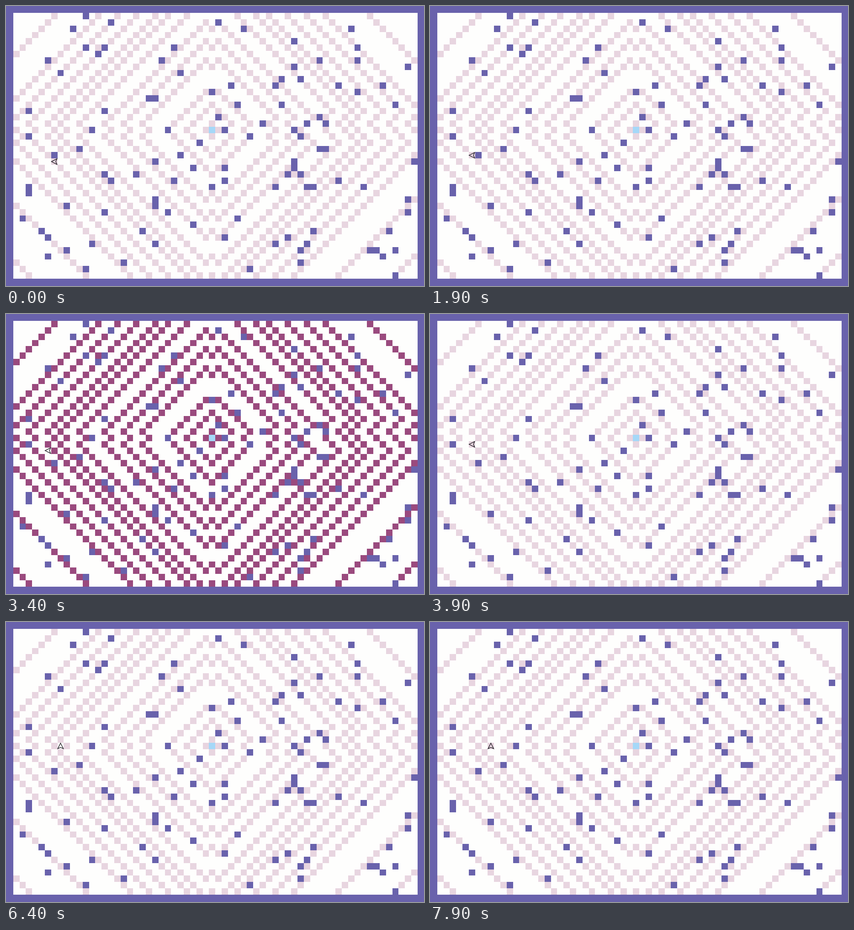
Animation of 915x612 px, one loop 8 s. Source, as an HTML page with a canvas:

```html
<!DOCTYPE html>
<html lang="en">
<head>
<meta charset="utf-8">
<title>Grid waves</title>
<style>
  html, body { margin: 0; width: 100%; height: 100%; overflow: hidden; }
  canvas { display: block; }
</style>
</head>
<body>
<canvas id="stage" width="915" height="612"></canvas>
<script>
const ctx = document.getElementById('stage').getContext('2d');
const COLS = 64, ROWS = 42, CELL = 13.83, LEFT = 15.7, TOP = 15.1, LOOP = 8000;
const GOAL = { col: 31, row: 18 };
const COLORS = { wall: '#6962ac', floor: '#fefefd', pale: '#e8d5e0', vivid: '#9a4a7e', goal: '#a5d8f8' };

// Columns of the walls, one list per row.
const walls = [
  [11], [15, 32], [9, 36, 53], [], [44], [11, 14, 25, 54], [13],
  [5, 23, 48, 54], [44, 62], [7, 26], [42, 45], [34, 41, 51, 58], [31, 54], [21, 22],
  [35, 42, 60], [2, 14], [32, 48], [39, 46, 49], [12, 24, 33, 44], [2, 37, 45], [29],
  [10, 48, 49], [6, 26], [22, 44, 63], [28, 33, 44], [14, 19, 43, 45], [15, 25, 33, 51],
  [2, 31, 41, 46, 47, 55], [2], [22, 62], [8, 22], [14, 24, 62], [1, 35], [28],
  [4, 20, 47, 59], [5, 33, 43], [12, 22, 41, 46], [8, 45, 56, 57, 60], [5, 58],
  [17, 45], [11, 37], [60]
];
const waveSteps = new Set([1, 4, 7, 12, 15, 18, 22, 25, 27, 30, 33, 36, 43, 52]);

// Pointer poses: start time, column, row, quarter turns from north.
const poses = [
  [0, 6, 23, -1], [400, 5, 23, -1], [1900, 5, 22, -1], [2400, 5, 21, -1],
  [2900, 5, 20, -1], [3900, 5, 19, -1], [4400, 5, 18, -1], [5000, 5, 18, 0],
  [5900, 6, 18, 0], [6400, 7, 18, 0], [7900, 8, 18, 0]
];

// Walking distance from the goal, going around walls.
function floodFill() {
  const dist = walls.map(() => Array(COLS).fill(-1));
  const queue = [GOAL];
  dist[GOAL.row][GOAL.col] = 0;
  for (const { col, row } of queue) {
    for (const [dx, dy] of [[1, 0], [-1, 0], [0, 1], [0, -1]]) {
      const c = col + dx, r = row + dy;
      if (c < 0 || r < 0 || c >= COLS || r >= ROWS) continue;
      if (dist[r][c] >= 0 || walls[r].includes(c)) continue;
      dist[r][c] = dist[row][col] + 1;
      queue.push({ col: c, row: r });
    }
  }
  return dist;
}

const waveCells = [];
floodFill().forEach((line, row) => line.forEach((d, col) => {
  if (waveSteps.has(d)) waveCells.push([col, row]);
}));

const edgeX = col => Math.round(LEFT + col * CELL);
const edgeY = row => Math.round(TOP + row * CELL);

function fillCells(col, row, color, w = 1, h = 1) {
  const x = edgeX(col), y = edgeY(row);
  ctx.fillStyle = color;
  ctx.fillRect(x, y, edgeX(col + w) - x, edgeY(row + h) - y);
}

function drawPointer([, col, row, turns]) {
  ctx.save();
  ctx.translate(LEFT + (col + 0.5) * CELL, TOP + (row + 0.5) * CELL);
  ctx.rotate(turns * Math.PI / 2);
  ctx.beginPath();
  ctx.moveTo(0, -6.2);
  ctx.lineTo(6.2, 6);
  ctx.lineTo(0, 3.3);
  ctx.lineTo(-6.2, 6);
  ctx.closePath();
  ctx.lineWidth = 1.3;
  ctx.strokeStyle = '#1c1a20';
  ctx.stroke();
  ctx.restore();
}

function draw(time) {
  const t = time % LOOP;
  const phase = t % 2000;
  const waveColor = phase >= 1400 && phase < 1900 ? COLORS.vivid : COLORS.pale;

  ctx.fillStyle = COLORS.wall;
  ctx.fillRect(0, 0, 915, 612);
  fillCells(0, 0, COLORS.floor, COLS, ROWS);
  waveCells.forEach(([col, row]) => fillCells(col, row, waveColor));
  walls.forEach((line, row) => line.forEach(col => fillCells(col, row, COLORS.wall)));
  fillCells(GOAL.col, GOAL.row, COLORS.goal);
  drawPointer(poses.filter(pose => pose[0] <= t).pop());
}

const start = performance.now();
function tick() {
  draw(performance.now() - start);
  requestAnimationFrame(tick);
}
tick();
</script>
</body>
</html>
```
